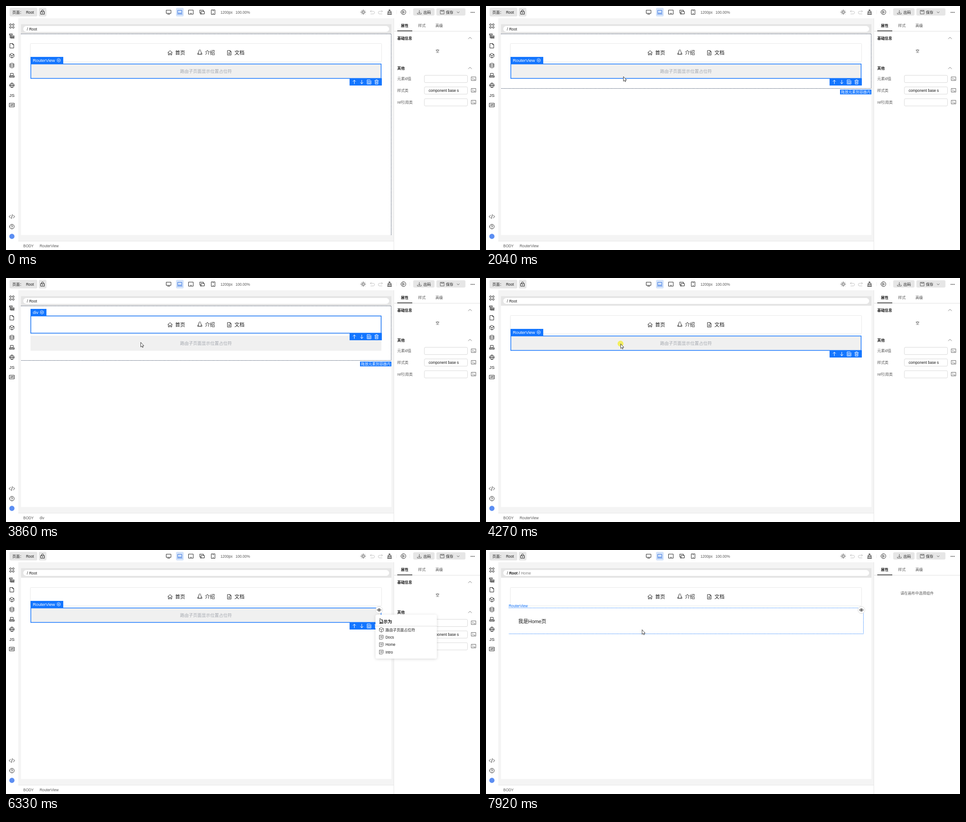
Animation of 1043x537 px, one loop 7990 ms. Source, as an HTML page:

```html
<!DOCTYPE html>
<html lang="zh-CN">
<head>
<meta charset="utf-8">
<title>页面编辑器</title>
<style>
html, body { margin: 0; width: 100%; height: 100%; overflow: hidden; background: #fff; }
svg { display: block; width: 1043px; height: 537px; }
text { font-family: "Liberation Sans", "Noto Sans CJK SC", "Noto Sans CJK", sans-serif; white-space: pre; }
</style>
</head>
<body>
<svg id="stage" viewBox="0 0 1043 537"></svg>
<script>
const LOOP = 7990, BLUE = '#1476ff', INK = '#191919';

// Text is placed by its left edge (or middle) and its vertical centre.
const text = (x, cy, s, o = {}) => {
  const size = o.size || 8.15;
  return `<text x="${x}" y="${cy + size * 0.37}" font-size="${size}" fill="${o.fill || INK}"` +
    ` font-weight="${o.bold ? 700 : 400}" text-anchor="${o.anchor || 'start'}">${s}</text>`;
};
const box = (x, y, x2, y2, fill, r = 0, stroke = 'none') =>
  `<rect x="${x}" y="${y}" width="${x2 - x}" height="${y2 - y}" rx="${r}" fill="${fill}" stroke="${stroke}"/>`;
const line = (d, stroke, w = 1, dash = '') =>
  `<path d="${d}" fill="none" stroke="${stroke}" stroke-width="${w}" stroke-dasharray="${dash}"/>`;
const icon = (x, y, d, stroke = INK, w = 0.95) =>
  `<path transform="translate(${x} ${y})" d="${d}" fill="none" stroke="${stroke}" stroke-width="${w}" stroke-linejoin="round" stroke-linecap="round"/>`;
const group = (id, body) => `<g id="${id}">${body}</g>`;
const ring = (r, x = 0, y = 0) => `M${x - r} ${y}a${r} ${r} 0 1 0 ${2 * r} 0a${r} ${r} 0 1 0 ${-2 * r} 0`;
const rect = (x, y, w, h) => `M${x} ${y}h${w}v${h}h${-w}z`;

const D = {
  cube: 'M0-5L4.5-2.5V2.5L0 5L-4.5 2.5V-2.5zM-4.5-2.5L0 0L4.5-2.5M0 0V5',
  gear: 'M0-4L3.5-2V2L0 4L-3.5 2V-2z' + ring(1.4),
  page: 'M-4-5H1.5L4-2.5V5H-4zM1.5-5V-2.5H4',
  doc: 'M-3.8-5H1.5L3.8-2.5V5H-3.8zM1.5-5V-2.5H3.8M-1.8 0H1.8M-1.8 2.3H1.8',
  home: 'M-4.8-.5L0-4.8L4.8-.5M-3.7-1.3V4.7H-1.3V1.2H1.3V4.7H3.7V-1.3',
  loop: 'M-1.8-3.6A2 2 0 1 1 1.8-3.6L4 1M-1.8-3.6L-4 1' + ring(1.5, -3.4, 2.5) + ring(1.5, 3.4, 2.5) + 'M-1.8 3.5H1.8',
  database: 'M-4.3-3.2a4.3 1.8 0 1 0 8.6 0a4.3 1.8 0 1 0-8.6 0V3.2a4.3 1.8 0 0 0 8.6 0V-3.2M-4.3 0a4.3 1.8 0 0 0 8.6 0',
  globe: ring(5) + 'M-5 0H5M0-5C-3-2-3 2 0 5C3 2 3-2 0-5',
  tree: 'M-5-4.5H1V-2H-5zM-2 0H5V2H-2zM-2 3.5H5V5H-2zM-4-2V4.2H-2',
  blocks: ring(2, -3, -3) + ring(2, 3, -3) + ring(2, -3, 3) + ring(2, 3, 3),
  stamp: 'M-3-4.5H3V.5H-3zM-5 .5V4.3H5V.5M-5 2H5',
  code: 'M-3-3L-6 0L-3 3M3-3L6 0L3 3M1-4.5L-1 4.5',
  help: ring(5) + 'M-1.5-1.2A1.5 1.5 0 1 1 0 .6V1.2M0 2.8V3',
  up: 'M0 4V-4M-3-1L0-4L3-1',
  down: 'M0-4V4M-3 1L0 4L3 1',
  copy: 'M-4-4.5H2L4-2.5V4.5H-4zM-1.8-1.5H1.8V2.5H-1.8z',
  trash: 'M-4-3H4M-1.5-4.7H1.5M-3-3V4.6H3V-3M-1-.8V2.5M1-.8V2.5',
  eye: 'M-4.5 0Q0-5.5 4.5 0Q0 5.5-4.5 0' + ring(1.4),
  console: rect(-4.8, -4, 9.6, 8) + 'M-2.5-1.6L-.8 0L-2.5 1.6M.5 2H2.8',
  note: 'M-4-4.3H4V2L2 4.3H-4zM-2-1.5H2M-2 .8H2',
  chevron: 'M-3.5 1.8L0-1.8L3.5 1.8',
  lock: rect(-4, -1, 8, 5.5) + 'M-2.3-1V-2.5A2.3 2.3 0 0 1 2.3-2.5M0 1V2.5',
  monitor: rect(-5, -4.3, 10, 7) + 'M-2.5 4.6H2.5',
  laptop: rect(-4.4, -4, 8.8, 6.3) + 'M-5.5 4.3H5.5',
  tablet: rect(-5, -4.5, 10, 9) + 'M-1.2 2.6H1.2',
  devices: 'M-5-4.3H3V-1.5M-5-4.3V2H-2' + rect(-2, -1.5, 7, 5.5) + 'M-4 4.3H-2',
  phone: rect(-3.8, -5, 7.6, 10) + 'M-.8 2.8H.8M-.8-3H.8',
  sun: ring(2.6) + 'M0-5.3V-4.2M0 4.2V5.3M-5.3 0H-4.2M4.2 0H5.3M-3.7-3.7L-3-3M3 3L3.7 3.7M-3.7 3.7L-3 3M3-3L3.7-3.7',
  undo: 'M-2-4L-4.6-1.8L-2 .4M-4.6-1.8H2A2.8 2.8 0 0 1 2 4H-3.5',
  redo: 'M2-4L4.6-1.8L2 .4M4.6-1.8H-2A2.8 2.8 0 0 0-2 4H3.5',
  broom: 'M-1-5H1V-1.5H3.5V1H-3.5V-1.5H-1zM-3.5 1L-4.5 5H4.5L3.5 1M-1.5 5V3M1.5 5V3',
  play: ring(5.3) + 'M-1.4-2.4L2.4 0L-1.4 2.4z',
  output: 'M0-4V2M-2.3 0L0 2.3L2.3 0M-4.3 2V4.2H4.3V2',
  save: rect(-4, -4, 8, 8) + 'M-2-4V-1.5H2V-4'
};

function topBar() {
  const devices = ['monitor', 'laptop', 'tablet', 'devices', 'phone'];
  return box(0, 0, 1043, 27, '#fff') +
    box(8, 4, 69, 23, '#e6e6e6', 3) + text(14, 13.5, '页面：') + text(44, 13.5, 'Root') +
    box(72, 4, 89, 23, '#e6e6e6', 3) + icon(80.5, 13.5, D.lock) +
    box(374, 4, 391, 23, '#d5e4fa', 3) +
    devices.map((n, i) => icon(358 + i * 24.5, 13.5, D[n], n === 'laptop' ? '#2f6fe0' : INK)).join('') +
    text(472, 13.5, '1200px', { fill: '#595959' }) + text(505, 13.5, '100.00%', { fill: '#595959' }) +
    icon(786, 13.5, D.sun) + icon(806, 13.5, D.undo, '#c2c2c2') + icon(824, 13.5, D.redo, '#c2c2c2') +
    icon(844, 13.5, D.broom) + line('M859.5 9V18M888.5 9V18', '#f0f0f0') + icon(874.5, 13.5, D.play) +
    box(896, 5, 943, 21, '#e6e6e6', 3) + icon(909.5, 13.5, D.output, '#595959') + text(918.5, 13.5, '出码') +
    box(947, 5, 1011, 21, '#e6e6e6', 3) + icon(960, 13.5, D.save, '#595959') + text(968, 13.5, '保存') +
    icon(995, 14, 'M-2.5-1.2L0 1.2L2.5-1.2', '#595959') +
    [1023.5, 1026.7, 1030].map(x => `<circle cx="${x}" cy="14" r=".9" fill="${INK}"/>`).join('');
}

function sideBar() {
  const names = ['blocks', 'tree', 'page', 'cube', 'database', 'stamp', 'globe'];
  return box(0, 27, 27, 537, '#fff') +
    names.map((n, i) => icon(13, 44 + i * 21.75, D[n])).join('') +
    text(13, 196.5, 'JS', { size: 9.8, anchor: 'middle' }) +
    icon(13, 218, rect(-5.3, -4, 10.6, 8)) + text(13, 218.2, 'API', { size: 4.6, bold: 1, anchor: 'middle' }) +
    icon(13, 463.5, D.code) + icon(13, 485.5, D.help) +
    '<circle cx="13" cy="507" r="5.7" fill="#5b8df2"/>';
}

function panel() {
  const fields = [['元素id值', 160], ['样式类', 185.5], ['ref引用类', 211.5]];
  const head = (s, y) => text(861, y, s, { bold: 1 }) + icon(1021, y, D.chevron, '#595959', 0.8);
  return box(853, 27, 1043, 537, '#fff') + line('M853.5 27V537', '#e6e6e6') +
    text(869, 43, '属性', { bold: 1 }) + text(907, 43, '样式', { fill: '#595959' }) + text(945, 43, '高级', { fill: '#404040' }) +
    line('M854 55.5H1043', '#e0e0e0') + box(861, 54, 894, 55.4, INK) +
    group('props', head('基础信息', 70.5) + text(949.5, 99, '空', { anchor: 'middle', fill: '#404040' }) + head('其他', 136.5) +
      fields.map(([s, y]) => text(861, y, s, { fill: '#595959' }) +
        box(920.5, y - 7.5, 1015.5, y + 8.5, '#fff', 2.5, '#d9d9d9') + icon(1029, y, D.console, '#404040', 0.8)).join('') +
      text(930, 186, 'component base s')) +
    group('noProps', text(948.5, 95, '请在画布中选择组件', { anchor: 'middle', fill: '#595959' }));
}

function canvas() {
  const nav = [['home', '首页', 361], ['loop', '介绍', 426.5], ['doc', '文档', 491.5]];
  return box(27, 27, 853, 517, '#f4f4f4') + box(33, 40, 848, 61, '#e5e5e5') + box(38, 44, 843, 57, '#fff', 6.5) +
    text(46, 50.5, '/') + group('pathRoot', text(51, 50.5, 'Root')) +
    group('pathHome', text(51, 50.5, 'Root', { bold: 1 }) + text(72, 50.5, '/') + text(77, 50.5, 'Home', { fill: '#808080' })) +
    box(33, 61, 848, 504, '#fff') +
    box(53.5, 82.5, 826.5, 123, '#fff', 2, '#e8e8e8') +
    nav.map(([n, s, x]) => icon(x, 103, D[n]) + text(x + 11.3, 103, s, { size: 10.9 })).join('') +
    group('slot', box(54, 127, 826, 160, '#f0f0f0') + text(440, 143.7, '路由子页面显示位置占位符', { size: 9.5, fill: '#a5a9b0', anchor: 'middle' })) +
    group('homePage', text(71, 156.5, '我是Home页', { size: 10.9 })) +
    box(27, 517, 853, 537, '#fff') + line('M27 517.5H853', '#e6e6e6') +
    text(38, 527.5, 'BODY', { fill: '#595959' }) +
    group('crumbDiv', text(74, 527.5, 'div', { fill: '#595959' })) +
    group('crumbView', text(74, 527.5, 'RouterView', { fill: '#595959' }));
}

function selection(id, name, right, top, bottom) {
  const tools = ['up', 'down', 'copy', 'trash'];
  return group(id,
    `<rect x="54.6" y="${top + 0.6}" width="770.8" height="${bottom - top - 1.2}" fill="none" stroke="${BLUE}" stroke-width="1.5"/>` +
    box(54, top - 15, right, top, BLUE) + text(59, top - 7.5, name, { size: 9.5, fill: '#fff' }) +
    icon(right - 10, top - 7.5, D.gear, '#fff', 0.8) +
    box(756, bottom - 1, 827, bottom + 15, BLUE) +
    tools.map((n, i) => icon(766.5 + i * 16.3, bottom + 7.2, D[n], '#fff', 1)).join(''));
}

function hovers() {
  const dots = '1.4 1.3', dark = '#24344f';
  const label = x => text(x, 123, 'RouterView', { fill: BLUE });
  return group('hoverBody', line('M33 61.5H847.5V504', dark, 1, dots)) +
    group('hoverBox', line('M33 61.5H847.5V181.5H33', dark, 1, dots) + box(779, 184, 848, 194.5, BLUE) +
      text(781, 189.3, '拖放元素到容器内', { fill: '#fff' })) +
    group('hoverOld', label(55) + line('M54.5 160V127.5H825', BLUE, 1, dots)) +
    group('hoverNew', label(50) + line('M50 127.5H830.5V184.5H50', BLUE, 1, dots));
}

function popup() {
  const rows = ['路由子页面占位符', 'Docs', 'Home', 'Intro'];
  return group('popup', '<rect x="813" y="142.5" width="135" height="96.5" rx="4" fill="#fff" filter="url(#shade)"/>' +
    '<rect id="row" x="813" width="135" height="16.3" fill="#f3f3f3"/>' +
    text(821, 157, '显示为', { size: 9.5, bold: 1 }) + line('M813 167.5H948', '#dcdcdc') +
    rows.map((s, i) => icon(826, 175.7 + i * 16.3, i ? D.note : D.cube, '#404040', 0.85) + text(835, 175.7 + i * 16.3, s)).join(''));
}

document.getElementById('stage').innerHTML =
  '<filter id="shade" x="-20%" y="-20%" width="140%" height="140%"><feDropShadow dx="0" dy="1" stdDeviation="3" flood-opacity=".16"/></filter>' +
  canvas() + topBar() + sideBar() + panel() +
  selection('pickView', 'RouterView', 126, 127, 160) + selection('pickDiv', 'div', 89, 83, 122) + hovers() +
  group('eye', '<circle r="7.7" fill="#fff" stroke="#dcdcdc"/>' + icon(0, 0, D.eye)) + popup() +
  '<circle id="click" r="6.5" fill="#f4ee3c" fill-opacity=".8"/>' +
  '<path id="cursor" d="M.4.4V10.6L2.7 8.5L4.2 11.8L5.7 11.1L4.3 8H7.3z" fill="#fff" stroke="#111" stroke-width=".8"/>';

// Pointer path: time, x, y
const path = [
  [0, 993, 545], [69, 993, 545], [70, 992, 530], [480, 525, 283], [680, 525, 283],
  [1370, 304, 180.5], [1700, 304, 181], [1910, 304, 181], [2040, 302, 155], [2100, 302, 155],
  [2420, 297, 107.5], [3240, 297, 107.5], [4000, 296, 144.5], [4560, 296, 144.5],
  [5370, 818.5, 136.5], [5570, 819, 137.5], [5750, 819, 137.5], [6330, 822.5, 150], [6560, 822.5, 150],
  [6900, 826, 206], [7100, 826, 206], [7330, 826.5, 212], [7430, 826.5, 212], [7920, 343, 175], [LOOP, 343, 175]
];
const clamp = v => Math.max(0, Math.min(1, v));

function pointer(t) {
  const i = Math.max(1, path.findIndex(k => k[0] > t));
  const [a, b] = [path[i - 1], path[i]];
  const u = clamp((t - a[0]) / (b[0] - a[0]));
  const e = u * u * (3 - 2 * u);
  return [a[1] + (b[1] - a[1]) * e, a[2] + (b[2] - a[2]) * e];
}

const el = id => document.getElementById(id);
const show = (id, on) => el(id).setAttribute('display', on ? 'inline' : 'none');
const move = (id, x, y) => el(id).setAttribute('transform', `translate(${x} ${y})`);

function draw(t) {
  const within = (a, b) => t >= a && t < b;
  const [x, y] = pointer(t);
  const home = t >= 7110;
  const divPicked = within(2580, 4200);
  const viewPicked = !home && !divPicked;

  show('pathRoot', !home); show('pathHome', home);
  show('slot', !home); show('homePage', home);
  show('props', !home); show('noProps', home);
  show('crumbDiv', divPicked); show('crumbView', viewPicked);
  show('pickDiv', divPicked); show('pickView', viewPicked);
  show('hoverBody', t < 1240 || within(7500, 7790));
  show('hoverBox', within(1240, 2110) || within(3460, 3930));
  show('hoverOld', within(7110, 7500));
  show('hoverNew', t >= 7790);
  show('eye', within(4670, 7500) || t >= 7790);
  move('eye', t >= 7790 ? 826 : 821, 132);

  const alpha = clamp((t - 5840) / 200) * clamp((7430 - t) / 200);
  const row = Math.floor((Math.min(y, 215) - 167.5) / 16.3);
  show('popup', alpha > 0);
  el('popup').setAttribute('opacity', alpha);
  show('row', row >= 0);
  el('row').setAttribute('y', 167.5 + row * 16.3);

  show('click', within(2440, 2640) || within(4070, 4340) || within(6930, 7140));
  move('click', x, y);
  move('cursor', x, y);
}

function tick() {
  draw(performance.now() % LOOP);
  requestAnimationFrame(tick);
}
tick();
</script>
</body>
</html>
```
